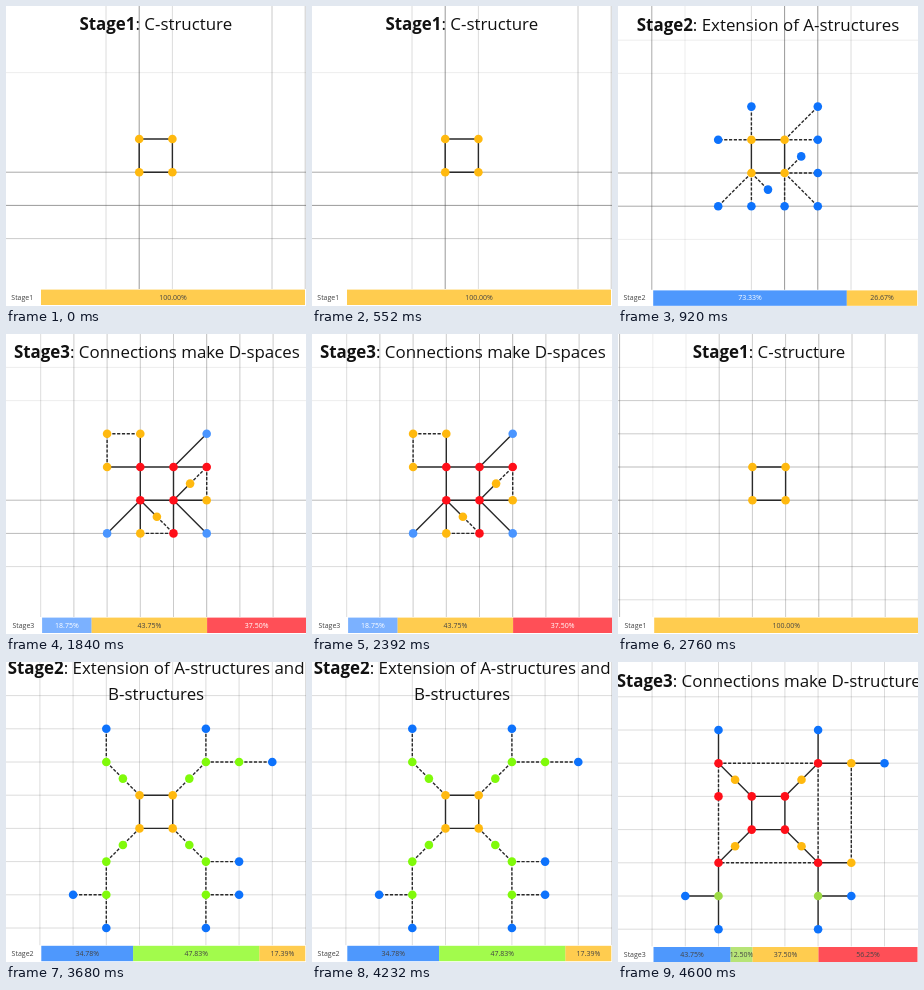
An HTML page that plays this animation: 300 by 300 pixels, repeating every 5520 ms.

```html
<!DOCTYPE html>
<html lang="en">
<head>
<meta charset="utf-8">
<title>Structure stages</title>
<style>
  html, body { margin: 0; width: 100%; height: 100%; overflow: hidden; background: #fff; }
  svg { display: block; width: 100vw; height: 100vh; }
  text { font-family: "Open Sans", "Noto Sans", sans-serif; text-anchor: middle; }
  .title { font-size: 16.9px; fill: #111; }
  .small { font-size: 7px; fill: #444; }
  path { fill: none; stroke: #2a2a2a; stroke-width: 1.4; vector-effect: non-scaling-stroke; }
  .dash { stroke-dasharray: 3.2 1.6; }
</style>
</head>
<body>
<svg id="stage" viewBox="0 0 300 300"></svg>
<script>
const HOLD = 920, UNIT = 33.2, LEFT = 133.4, TOP = 133;
const BAR = { x: 35.2, y: 283.6, width: 264, height: 15.4 };
const COLORS = { blue: '#0d72fc', green: '#80fa0a', yellow: '#ffb90f', red: '#ff0f19' };
const SQUARE = 'M0 0H1V1H0Z';
const CORNERS = '0,0 1,0 0,1 1,1';

// Positions are in grid units from the square's top left corner.
// v and h give the strength of each grid line, 0 to 9; shift moves the whole slide.
const spokes = 'M0 0V-1M0 0H-1M1 0L2 -1M1 0H2M1 1L1.5 .5M1 1H2M1 1L2 2M1 1V2M0 1V2M0 1L-1 2M0 1L.5 1.5';
const branches = 'M0 0L-1 -1V-2M1 0L2 -1V-2M2 -1H4M0 1L-1 2V4M-1 3H-2M1 1L2 2V4M2 2H3M2 3H3';
const scenes = [
  { title: ['Stage1', ': C-structure'], shift: [-.2, 0], v: '0002620033', h: '001005630',
    solid: SQUARE, nodes: { yellow: CORNERS } },
  { title: ['Stage2', ': Extension of A-structures'], shift: [0, .8], v: '0510266200', h: '011005510',
    solid: SQUARE, dashed: spokes, light: 'blue',
    nodes: {
      blue: '0,-1 2,-1 -1,0 2,0 1.5,.5 2,1 .5,1.5 -1,2 0,2 1,2 2,2',
      yellow: CORNERS } },
  { title: ['Stage3', ': Connections make D-spaces'], shift: [.9, 0], v: '0233334330', h: '011004420',
    solid: SQUARE + spokes,
    dashed: 'M-1 0V-1H0M1.5 .5L2 0V1M.5 1.5L1 2H0', light: 'blue red',
    nodes: {
      blue: '2,-1 -1,2 2,2',
      yellow: '-1,-1 0,-1 -1,0 1.5,.5 2,1 .5,1.5 0,2',
      red: CORNERS + ' 2,0 1,2' },
    tint: { blue: '#4a95ff' } },
  { title: ['Stage1', ': C-structure'], shift: [1, 0], v: '4113334332', h: '013345432',
    solid: SQUARE, nodes: { yellow: CORNERS } },
  { title: ['Stage2', ': Extension of A-structures and', 'B-structures'], shift: [.1, .2],
    v: '0222222222', h: '022222222', solid: SQUARE, dashed: branches,
    nodes: {
      blue: '-1,-2 2,-2 4,-1 3,2 3,3 -2,3 -1,4 2,4',
      green: '-1,-1 -.5,-.5 2,-1 1.5,-.5 3,-1 -.5,1.5 1.5,1.5 -1,2 2,2 -1,3 2,3',
      yellow: CORNERS } },
  { title: ['Stage3', ': Connections make D-structures'], titleX: 154.5, shift: [.3, 1.4],
    v: '0222222220', h: '022222222', solid: SQUARE + branches,
    dashed: 'M-1 -1H2V2H-1ZM3 -1V2', base: 16,
    nodes: {
      blue: '-1,-2 2,-2 4,-1 3,3 -2,3 -1,4 2,4',
      green: '-1,3 2,3',
      yellow: '-.5,-.5 1.5,-.5 3,-1 -.5,1.5 1.5,1.5 3,2',
      red: CORNERS + ' -1,-1 2,-1 -1,0 -1,2 2,2' },
    tint: { green: '#9ddb45' } }
];

const gridLines = (digits, origin, toPath) => [...digits].map((d, i) =>
  `<path d="${toPath(origin + (i - 4) * UNIT)}" style="stroke:#555;stroke-width:1" opacity="${d / 10}"/>`).join('');

function drawTitle([bold, rest, second], x) {
  const y = second ? 12 : 24;
  return `<text class="title" x="${x}" y="${y}"><tspan font-weight="700">${bold}</tspan>${rest}</text>` +
    (second ? `<text class="title" x="${x}" y="38">${second}</text>` : '');
}

function drawScene({ title, titleX = 150, shift, v, h, solid, dashed = '', nodes, tint = {}, light = '', base }) {
  const groups = Object.entries(nodes).map(([name, list]) =>
    ({ name, color: tint[name] || COLORS[name], points: list.split(' ').map(p => p.split(',')) }));
  const total = groups.reduce((sum, g) => sum + g.points.length, 0);

  let dots = '', bar = '', x = BAR.x;
  for (const { name, color, points } of groups) {
    for (const [px, py] of points)
      dots += `<circle cx="${LEFT + px * UNIT}" cy="${TOP + py * UNIT}" r="4.3" fill="${color}"/>`;
    const width = BAR.width * points.length / total;
    const percent = (100 * points.length / (base || total)).toFixed(2);
    const ink = light.includes(name) ? '#fff' : '#444';
    bar += `<rect x="${x}" y="${BAR.y}" width="${width}" height="${BAR.height}" fill="${color}" opacity=".73"/>
      <text class="small" x="${x + width / 2}" y="293.5" style="fill:${ink}">${percent}%</text>`;
    x += width;
  }

  return `<g visibility="hidden" transform="translate(${shift})">
    ${gridLines(v, LEFT, p => `M${p} -9V309`)}${gridLines(h, TOP, p => `M-9 ${p}H309`)}
    <g transform="translate(${LEFT} ${TOP}) scale(${UNIT})"><path d="${solid}"/><path class="dash" d="${dashed}"/></g>
    ${dots}
    <rect x="-9" y="283" width="318" height="30" fill="#fff"/>
    <text class="small" x="16.5" y="293.5">${title[0]}</text>${bar}
    ${drawTitle(title, titleX)}</g>`;
}

const stage = document.getElementById('stage');
stage.innerHTML = scenes.map(drawScene).join('');

function tick() {
  const current = Math.floor(performance.now() / HOLD) % scenes.length;
  [...stage.children].forEach((g, i) => g.setAttribute('visibility', i === current ? 'visible' : 'hidden'));
  requestAnimationFrame(tick);
}
tick();
</script>
</body>
</html>
```
